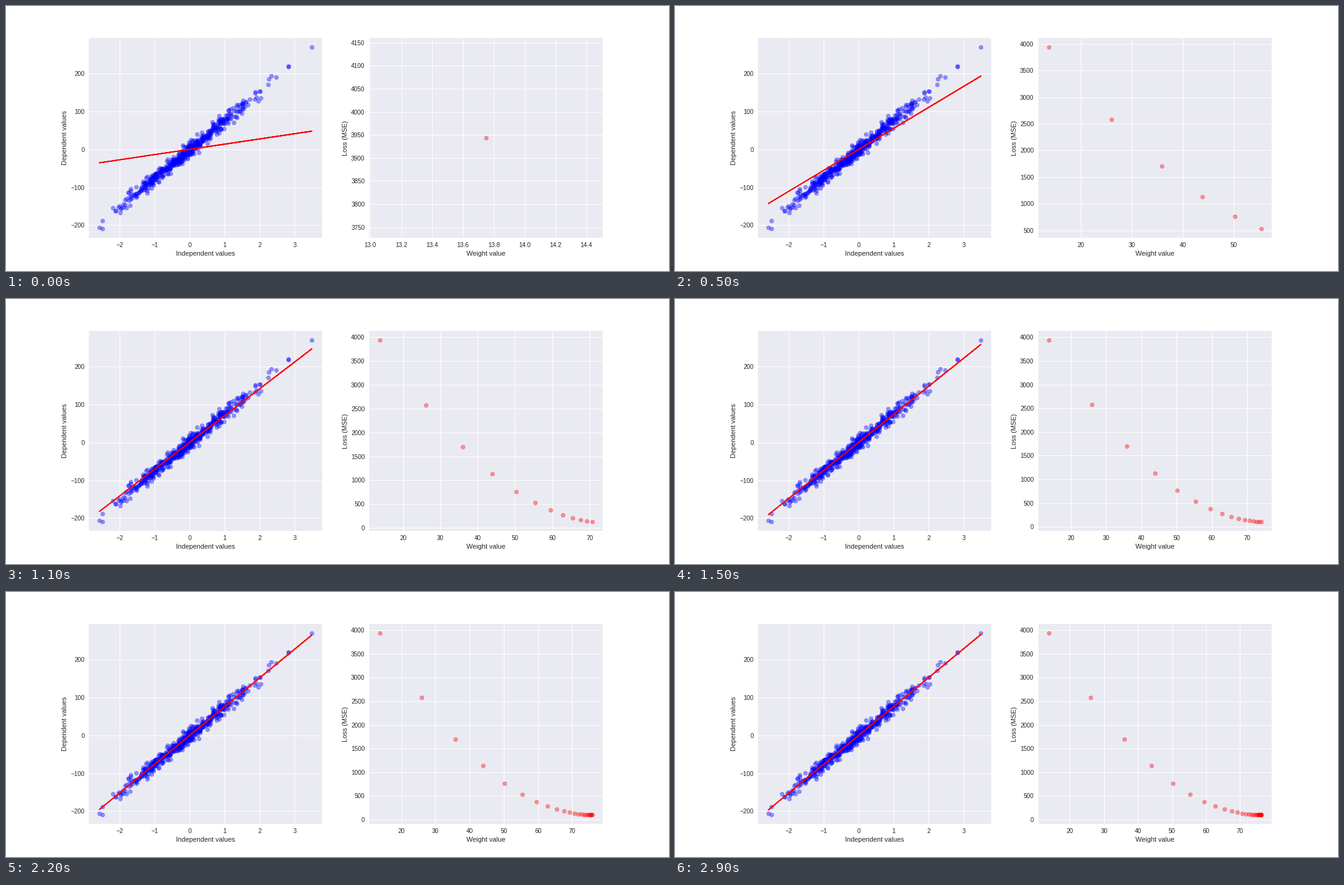
A matplotlib script that plays this animation: 1080 px wide and 432 px high, repeating every 3 s.

```python
import numpy as np
import matplotlib.pyplot as plt
from matplotlib.animation import FuncAnimation

plt.style.use("seaborn-v0_8")
plt.rcParams["font.family"] = "Liberation Sans"

FRAMES, INTERVAL = 30, 100
SAMPLES, NOISE = 500, 10
FIRST_WEIGHT, BEST_WEIGHT = 13.749, 76.3
VARIANCE = 0.9829       # mean square of the independent values
LEARNING_RATE = 0.1
LOWEST_LOSS = 98

# The outermost points, which set the axis limits.
EXTREMES = [(-2.575, -206), (-2.49, -209.3), (-2.49, -188),
            (2.33, 194), (2.47, 191), (2.81, 220), (2.82, 218), (3.487, 270)]


def make_cloud():
    """Normally distributed values on a noisy line, plus the outermost points."""
    rng = np.random.default_rng(7)
    x = rng.standard_normal(SAMPLES)
    x = x[np.abs(x) < 2.3]
    y = BEST_WEIGHT * x + rng.normal(scale=NOISE, size=x.size)
    ends_x, ends_y = np.transpose(EXTREMES)
    return np.append(x, ends_x), np.append(y, ends_y)


# Each descent step shrinks the distance to the best weight by the same factor.
shrink = 1 - 2 * LEARNING_RATE * VARIANCE
gap = (BEST_WEIGHT - FIRST_WEIGHT) * shrink ** np.arange(FRAMES)
weights = BEST_WEIGHT - gap
losses = LOWEST_LOSS + VARIANCE * gap ** 2

x, y = make_cloud()
fig, (data_ax, loss_ax) = plt.subplots(1, 2, figsize=(15, 6), dpi=72)
fig.subplots_adjust(left=0.125, right=0.9, bottom=0.125, top=0.88, wspace=0.2)

data_ax.scatter(x, y, color="blue", alpha=0.4)
data_ax.set(xlabel="Independent values", ylabel="Dependent values")
data_ax.set(xlim=data_ax.get_xlim(), ylim=data_ax.get_ylim())
fit_line, = data_ax.plot(x, weights[0] * x, color="red")


def update(frame):
    shown = slice(frame + 1)
    fit_line.set_ydata(weights[frame] * x)
    loss_ax.clear()
    loss_ax.scatter(weights[shown], losses[shown], color="red", alpha=0.4)
    loss_ax.set(xlabel="Weight value", ylabel="Loss (MSE)")


anim = FuncAnimation(fig, update, frames=FRAMES, interval=INTERVAL, repeat=True)
plt.show()
```
